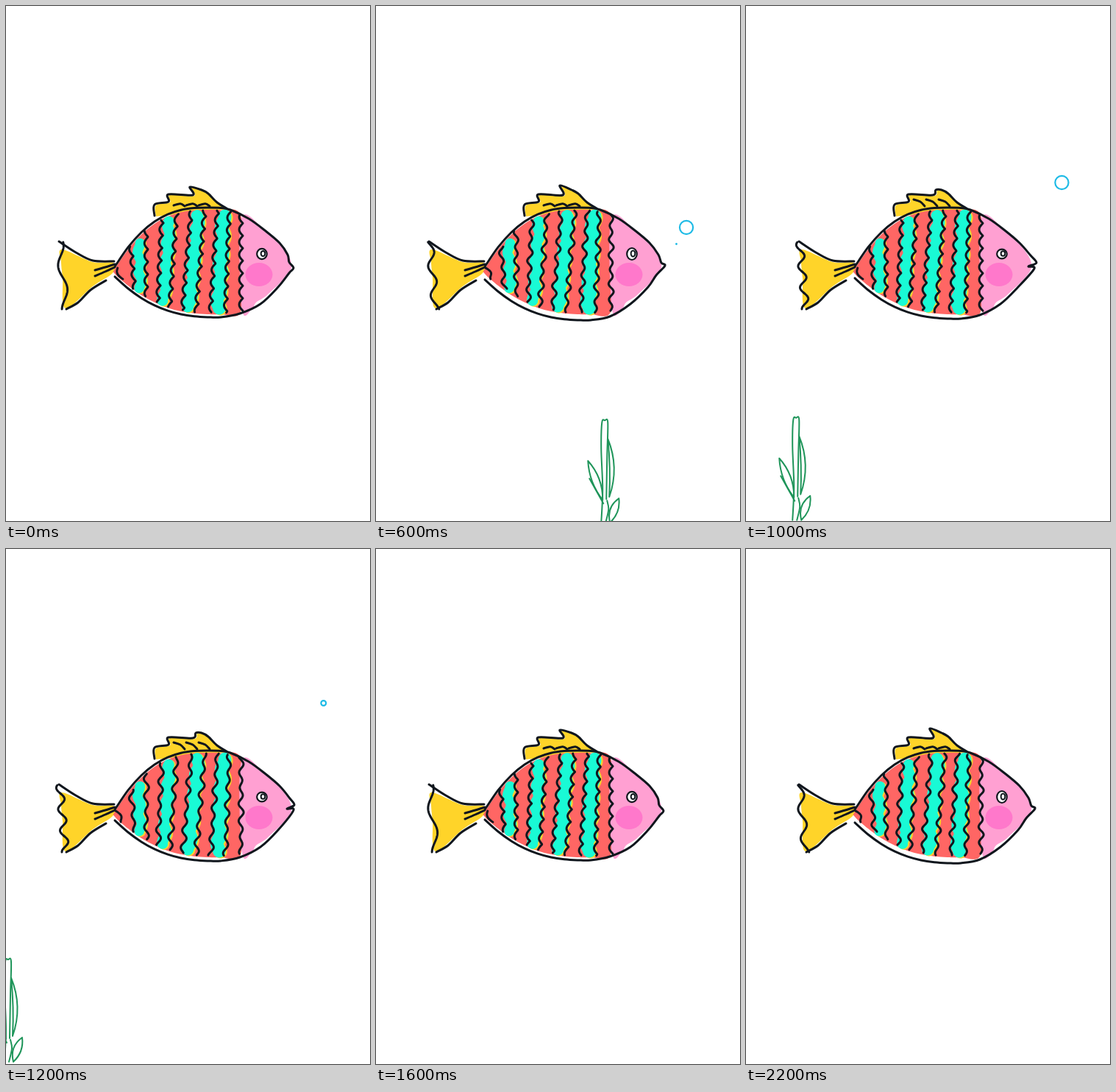
An HTML page with a canvas for the animation above (2.4 s loop, 495 by 700 pixels).

```html
<!DOCTYPE html>
<html>
<head>
<meta charset="utf-8">
<style>
html, body { margin: 0; width: 100%; height: 100%; overflow: hidden; background: #fff; }
canvas { display: block; }
</style>
</head>
<body>
<canvas id="stage" width="495" height="700"></canvas>
<script>
const ctx = document.getElementById('stage').getContext('2d');
const INK = '#10161d', YELLOW = '#ffd429', CORAL = '#ff6664', TEAL = '#19fad5',
      PINK = '#ffa0d2', CHEEK = '#ff78cb', GREEN = '#1f955a', BLUE = '#1fbbe6';
const STEP = 200, STEPS = 12, LINE = 3;
const { sin, cos, abs, PI } = Math;

const range = (n, f) => Array.from({ length: n }, (_, i) => f(i));
const points = text => text.split(' ').map(s => s.split(',').map(Number));

// Smooth curve through key points
function curve(p, closed) {
  const n = p.length;
  const at = i => closed ? p[(i + n) % n] : p[Math.max(0, Math.min(n - 1, i))];
  const path = new Path2D();
  path.moveTo(...p[0]);
  for (let i = 0; i < n - (closed ? 0 : 1); i++) {
    const [a, b, c, d] = [at(i - 1), at(i), at(i + 1), at(i + 2)];
    path.bezierCurveTo(b[0] + (c[0] - a[0]) / 6, b[1] + (c[1] - a[1]) / 6,
      c[0] - (d[0] - b[0]) / 6, c[1] - (d[1] - b[1]) / 6, c[0], c[1]);
  }
  return path;
}

// Line from top to bottom, displaced sideways by shape(distance)
function ripple(x0, y0, x1, y1, shape) {
  const path = new Path2D();
  for (let y = y0; y <= y1; y++) {
    path.lineTo(x0 + (x1 - x0) * (y - y0) / (y1 - y0) + shape(y - y0), y);
  }
  return path;
}

// Two bowed sides between a base and a tip
function leaf(x0, y0, x1, y1, bowA, bowB) {
  const len = Math.hypot(x1 - x0, y1 - y0);
  const nx = (y0 - y1) / len, ny = (x1 - x0) / len;
  const path = new Path2D();
  for (const bow of [bowA, bowB]) {
    path.moveTo(x0, y0);
    path.quadraticCurveTo((x0 + x1) / 2 + nx * bow, (y0 + y1) / 2 + ny * bow, x1, y1);
  }
  return path;
}

function oval(x, y, rx, ry = rx) {
  const path = new Path2D();
  path.ellipse(x, y, rx, ry, 0, 0, 7);
  return path;
}

function fill(path, color) {
  ctx.fillStyle = color;
  ctx.fill(path);
}

function stroke(path, color, width) {
  ctx.strokeStyle = color;
  ctx.lineWidth = width;
  ctx.stroke(path);
}

function shifted(x, y, paint) {
  ctx.save();
  ctx.translate(x, y);
  paint();
  ctx.restore();
}

// Upper and lower edge of the coloured flank
const back = x => 275 + 77 * abs((275 - x) / 125) ** 2.6;
const belly = x => 421 - 44 * abs((285 - x) / 125) ** 2.45;
const edge = (f, dy) => range(9, i => [148 + 18 * i, f(148 + 18 * i) + dy]);

const flank = curve([...edge(back, 2), [319, 284], [320, 350], [319, 416], ...edge(belly, -2).reverse()], true);
const head = curve(points('320,289 352,305 373,324 388,356 357,391 340,403 335,411 321,412'), true);
const tailFill = curve(points('76,331 118,348 146,349 145,363 118,381 81,411 77,370 75,348'), true);

// Centre line of the i-th seam; fractions fall between seams
function seamLine(i) {
  const x = 154 + 18.4 * i, lean = 6 * sin(PI * (i - 2) / 7);
  return [x + lean, back(x + lean) + 3, x - lean, belly(x - lean) - 4];
}

// Fill and teal bands never change between poses
const bands = [1.5, 3.5, 5.5, 7.5].map(i => ({
  path: ripple(...seamLine(i).map((v, k) => v + [0, 7, 0, -6][k]), d => 2 * sin(d / 4 + i)),
  width: 12.5 + i * .7
}));

const scallop = i => d => 2.5 - 5 * abs(sin(d * PI / 17 + i * .8));
const wave = (period, turn) => i => d => 2.6 * sin(2 * PI * d / period + i * turn) + sin(d / 5 + i * 2);

function makePose({ nose, tip, sag, tailPeriod, rayDrop, eyeHeight, seam }) {
  const fin = curve([...points('202,285 202,270 221,266 221,256 254,257'), tip,
    ...points('266,250 275,255 287,267 300,275')]);
  const outline = curve([...edge(back, -1), ...points('305,277 330,289 352,305 372,322'), ...points(nose),
    ...points('370,382 346,405'), [318, 418 + sag], ...edge(belly, 2 + sag).reverse()]);
  const lines = [
    outline, fin,
    curve(points('72,320 95,335 118,346 147,347')),
    curve(points('82,412 98,403 115,386 136,373')),
    ripple(73, 321, 81, 412, d => -5 * cos(2 * PI * (d - 33) / tailPeriod)),
    ...range(2, k => curve([[148, 351 + 4 * k], [135, 355 + 6 * k], [121, 359 + 8 * k]])),
    ...range(3, k => curve([[228 + 17 * k, 272 - rayDrop], [237 + 17 * k, 269 - rayDrop / 3], [243 + 17 * k, 272]])),
    ...range(10, i => ripple(...seamLine(i), seam(i)))
  ];
  return { fin, lines, eyeHeight };
}

const glide = { nose: '383,338 385,348 391,356 385,363', tip: [250, 246], sag: 0, tailPeriod: 60,
  rayDrop: 1, eyeHeight: 7.2, seam: scallop };
const drift = { nose: '386,339 392,348 382,353 391,355', tip: [258, 250], sag: 1, tailPeriod: 29,
  rayDrop: 9, eyeHeight: 6.4, seam: wave(22, 1.3) };
const swell = { nose: '384,338 388,349 393,353 381,366', tip: [250, 244], sag: 4, tailPeriod: 40,
  rayDrop: 1, eyeHeight: 8, seam: wave(20, 2.1) };
const turn = { ...drift, nose: '387,339 395,349 384,354 392,357', sag: 2, seam: scallop };
const cycle = [glide, turn, drift, swell].map(makePose);

const weed = [
  leaf(168, 669, 148, 616, -9, 11),
  leaf(177, 665, 175, 586, 15, 3),
  leaf(178, 700, 190, 667, 9, -12),
  leaf(169, 674, 150, 640, 0, 0),
  curve(points('166,700 168,655 166,600 167,564 171,561 175,564 174,610 173,668')),
  curve(points('174,670 176,682 172,700'))
];

function drawFish({ fin, lines, eyeHeight }) {
  shifted(2, 1, () => fill(fin, YELLOW));
  fill(tailFill, YELLOW);
  fill(flank, CORAL);
  fill(head, PINK);
  fill(oval(344, 365, 18.5, 16), CHEEK);
  for (const { path, width } of bands) {
    shifted(2, 1, () => stroke(path, YELLOW, width));
    stroke(path, TEAL, width);
  }
  for (const line of lines) stroke(line, INK, LINE);
  const eye = oval(348, 337, 6.8, eyeHeight);
  fill(eye, '#fff');
  stroke(eye, INK, 2.2);
  stroke(oval(349.5, 336.5, 2.8, eyeHeight / 2), INK, 2);
}

// k counts the steps since the bubble left the mouth
function drawBubble(k) {
  const x = 417 + 5.5 * k - .45 * k * k, y = 331.5 - 30.5 * k, r = 11 - 1.9 * (k - 2) ** 2;
  stroke(k ? oval(x, y, r) : leaf(x - 7, y + 9, x + 7, y - 9, 6, -6), BLUE, 2.2);
  if (k < 3) fill(oval(406 + 2.5 * k, 351 - 27.5 * k, .8 + .6 * k), BLUE);
}

function drawWeed(k) {
  shifted(318 - 196.5 * k + 18.75 * k * k, 4 - 1.75 * k, () => {
    for (const blade of weed) stroke(blade, GREEN, 2);
  });
}

function draw(step) {
  ctx.clearRect(0, 0, 495, 700);
  drawFish(cycle[step % 4]);
  const k = step - 2;
  if (k >= 0 && k <= 4) {
    drawBubble(k);
    drawWeed(k);
  }
}

ctx.lineCap = ctx.lineJoin = 'round';
const start = performance.now();
function tick() {
  draw(Math.floor((performance.now() - start) / STEP) % STEPS);
  requestAnimationFrame(tick);
}
tick();
</script>
</body>
</html>
```
